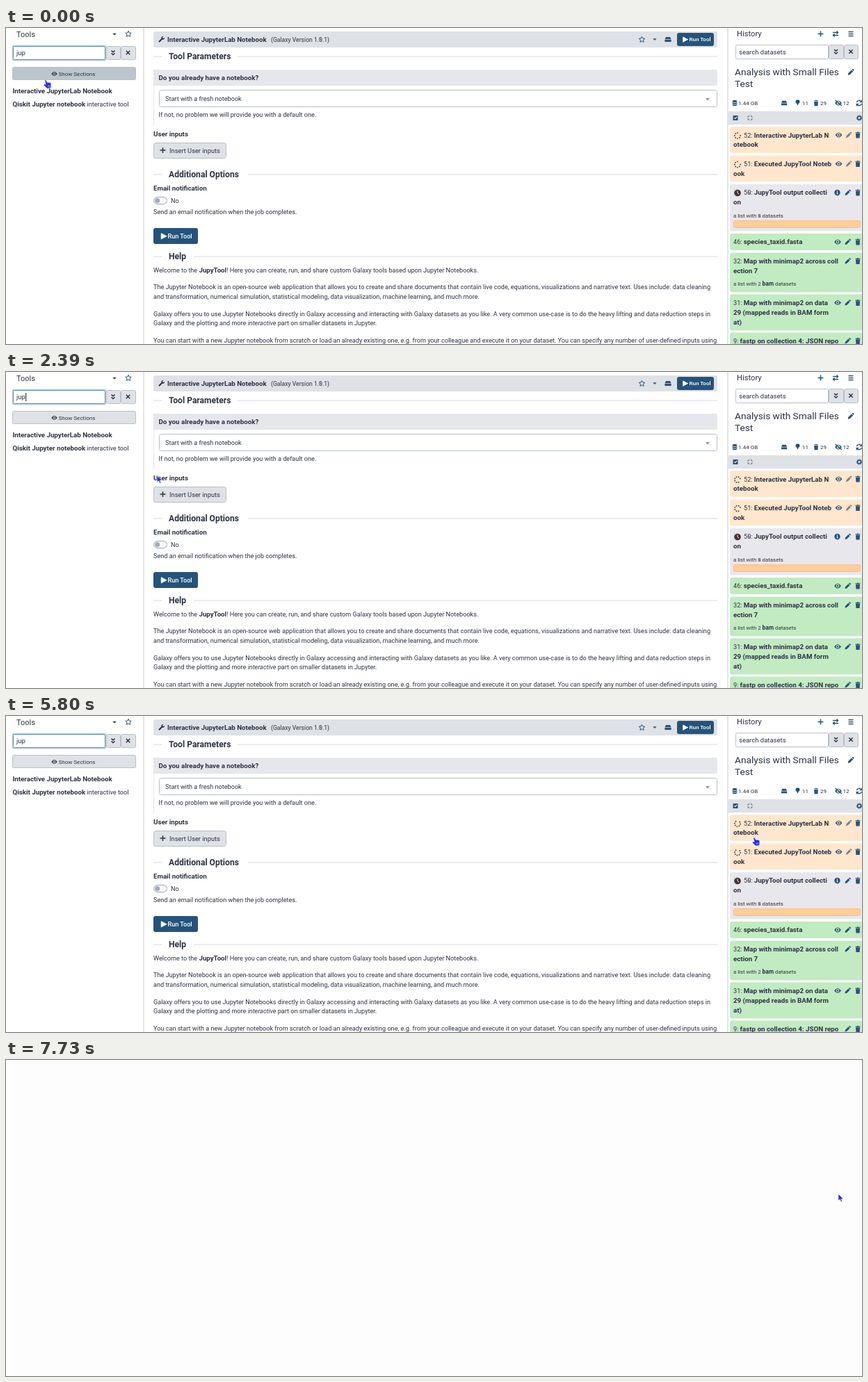
An HTML page for the animation above (8000 ms loop, 1231 px wide and 455 px high).

```html
<!DOCTYPE html>
<html lang="en">
<head>
<meta charset="utf-8">
<style>
html, body { margin: 0; width: 100%; height: 100%; overflow: hidden; background: #fff; }
svg { display: block; width: 100vw; height: 100vh; }
text { font-family: Roboto, sans-serif; fill: #2c3143; white-space: pre; }
.b { font-weight: 700; font-size: 1.065em; }
.i { font-style: italic; }
.light { fill: #fff; font-weight: 500; }
</style>
</head>
<body>
<svg id="stage" viewBox="0 0 1231 455"></svg>
<script>
const stage = document.getElementById('stage');
const BLUE = '#25537b', DARK = '#2c3143', GREY = '#dee2e6', EDGE = '#b9bec8';
const ORANGE = '#ffe6cd', AMBER = '#ffcc99', GREEN = '#c2ebc2';

function add(tag, attrs, parent = stage) {
  const node = document.createElementNS('http://www.w3.org/2000/svg', tag);
  for (const key in attrs) node.setAttribute(key, attrs[key]);
  return parent.appendChild(node);
}
const group = (parent) => add('g', {}, parent);
const box = (x, y, x2, y2, fill, more = {}, parent) =>
  add('rect', { x, y, width: x2 - x, height: y2 - y, fill, ...more }, parent);
const framed = (x, y, x2, y2, fill, stroke = EDGE, rx = 2) =>
  box(x + .5, y + .5, x2 - .5, y2 - .5, fill, { stroke, rx });
const path = (d, more, parent) => add('path', { d, ...more }, parent);

// y is the middle of the capitals; zeros get a back slash.
function text(x, y, size, content, more = {}, parent) {
  const node = add('text', { x, y: y + size * .355, 'font-size': size, ...more }, parent);
  node.innerHTML = content.replace(/<(b|i)>/g, '<tspan class="$1">').replace(/<\/[bi]>/g, '</tspan>');
  [...node.textContent].forEach((char, i) => {
    if (char !== '0') return;
    const p = node.getStartPositionOfChar(i);
    path(`M${p.x + size * .17} ${p.y - size * .55}l${size * .24} ${size * .42}`,
      { stroke: more.class ? '#fff' : DARK, 'stroke-width': .8 }, parent);
  });
  return node;
}

// Glyphs around 0,0; the listed ones are drawn as lines.
const glyphs = {
  plus: 'M-4 0h8M0-4v8',
  down: 'M-2.5-3l2.5 2.3L2.5-3M-2.5.7L0 3 2.5.7',
  cross: 'M-2.7-2.7l5.4 5.4M2.7-2.7l-5.4 5.4',
  bars: 'M-3.5-3h7M-3.5 0h7M-3.5 3h7',
  star: 'M0-4.2L1.3-1.5 4.2-1.2 2 .8 2.6 3.8 0 2.3-2.6 3.8-2 .8-4.2-1.2-1.3-1.5Z',
  swap: 'M-4-2h7.5M1.5-4l2 2-2 2M4 2h-7.5M-1.5 0l-2 2 2 2',
  sync: 'M-3.6-.8A3.7 3.7 0 0 1 3-2.2M3.6-4.2v2.8H.8M3.6.8A3.7 3.7 0 0 1-3 2.2M-3.6 4.2V1.4H-.8',
  shrink: 'M-4.2-1.7h2.5v-2.5M4.2-1.7H1.7v-2.5M-4.2 1.7h2.5v2.5M4.2 1.7H1.7v2.5',
  caret: 'M-2.7-1.3h5.4L0 1.6Z',
  play: 'M-4-4.5L4.5 0-4 4.5Z',
  eye: 'M-5 0Q0-7 5 0 0 7-5 0ZM-2.4 0a2.4 2.4 0 1 0 4.8 0a2.4 2.4 0 1 0-4.8 0ZM-1.3 0a1.3 1.3 0 1 0 2.6 0a1.3 1.3 0 1 0-2.6 0Z',
  trash: 'M-3.5-3.8h2l.6-.8H.9l.6.8h2v1h-7ZM-3-2.2h6L2.6 4.5h-5.2Z',
  pencil: 'M-4.3 4.3l.6-2.8L.9-3.1 3.1-.9-1.5 3.7ZM1.5-3.7l.9-.8 1 .1 1.1 1.1v.9l-.8.9Z',
  drive: 'M-3-3.5h6L4.6-.3h-9.2ZM-4.6.5h9.2v3h-9.2Z',
  data: 'M-3.5-3.3Q0-5.5 3.5-3.3v1.4Q0-.3-3.5-1.9ZM-3.5-1Q0 .6 3.5-1v2Q0 2.6-3.5 1ZM-3.5 1.9Q0 3.5 3.5 1.9v1.6Q0 5.5-3.5 3.5Z',
  pin: 'M0 4.5C-1-.3-3.2.3-3.2-1.8a3.2 3.2 0 0 1 6.4 0C3.2.3 1-.3 0 4.5Z',
  wrench: 'M-4.3 2.7L-.2-1.2C-.8-3.6 1-5 3-4.5L1.3-2.8l1.5 1.5L4.5-3C5 -.8 3.2.8 1.2.2L-2.8 4.2Z',
  check: 'M-3.5-3.5h7v7h-7ZM-2.2.1l.8-.8 1 1L1.8-1.9l.8.8L-.4 2Z'
};
const lined = ['plus', 'down', 'cross', 'bars', 'star', 'swap', 'sync', 'shrink'];
const thin = ['star', 'shrink'];
function icon(name, x, y, color = BLUE, scale = 1, parent) {
  const paint = lined.includes(name)
    ? { fill: 'none', stroke: color, 'stroke-width': thin.includes(name) ? 1 : 1.5 }
    : { fill: color, 'fill-rule': 'evenodd' };
  return path(glyphs[name], { ...paint, transform: `translate(${x} ${y}) scale(${scale})` }, parent);
}
function gear(x, y) {
  const ring = { cx: x, cy: y, fill: 'none', stroke: BLUE };
  add('circle', { ...ring, r: 2.5, 'stroke-width': 1.7 });
  add('circle', { ...ring, r: 3.6, 'stroke-width': 1, 'stroke-dasharray': '1.41 1.41' });
}

// Tool panel
text(15, 9, 11, 'Tools');
icon('caret', 156, 9, DARK);
icon('star', 176, 8.5);
const focusGlow = box(8.5, 24.5, 144.5, 47.5, '#c3d1de', { rx: 3 });
const searchBox = framed(10, 26, 143, 46, '#fff', BLUE);
text(15, 36, 9.6, 'jup');
const textCaret = box(28.3, 30, 29.2, 42, '#000');
framed(144, 26, 165, 46, GREY);
icon('down', 154, 35.5, DARK);
framed(165, 26, 187, 46, GREY);
icon('cross', 175.5, 35.5, DARK);
const sections = framed(9, 56, 187, 75, GREY);
icon('eye', 69.5, 66, DARK, .85);
text(75.5, 66, 8.05, 'Show Sections');
const toolRow = box(0, 81, 197, 100, '#e6e7ec');
text(9.5, 90.5, 9.15, '<b>Interactive JupyterLab Notebook</b>');
text(9.5, 110, 9.15, '<b>Qiskit Jupyter notebook</b> interactive tool');
box(197.5, 0, 198.5, 455, '#c9ccd3');

// Tool form
function heading(y, label, lineStart) {
  box(212, y - .5, 224, y + .5, '#d6d9de');
  box(lineStart, y - .5, 1023, y + .5, '#d6d9de');
  text(234, y, 12.1, label, { 'font-weight': 700 });
}
box(212, 5, 1023, 28, '#dee1e6', { rx: 2 });
icon('wrench', 223.5, 16.5, DARK);
text(232, 16.5, 9.1, '<b>Interactive JupyterLab Notebook</b>');
text(381, 16.5, 8.65, '(Galaxy Version 1.0.1)');
icon('star', 914.5, 16.5);
icon('caret', 933, 16.5);
icon('drive', 952, 16.5);
framed(965, 7, 1018, 26, BLUE, BLUE);
icon('play', 977, 16.5, '#fff', .95);
text(982.5, 16.5, 8.05, 'Run Tool', { class: 'light' });

heading(41, 'Tool Parameters', 333);
box(212, 60, 213, 140, '#e3e4e9');
box(212, 60, 1023, 83, '#e6e7ec', { rx: 2 });
text(219.5, 71.5, 9.15, '<b>Do you already have a notebook?</b>');
framed(220, 89, 1023, 114, '#fff', EDGE, 3);
text(229, 101.5, 9.15, 'Start with a fresh notebook');
icon('caret', 1009, 102.5, '#999', 1.2);
text(219.5, 125, 9.15, 'If not, no problem we will provide you with a default one.');
text(212, 153, 9.15, '<b>User inputs</b>');
framed(212, 165, 317, 188, GREY, EDGE, 3);
icon('plus', 225.5, 176, DARK);
text(235, 176.3, 9.3, 'Insert User inputs');

heading(211, 'Additional Options', 348);
text(212, 230.5, 9.15, '<b>Email notification</b>');
framed(212, 243, 232, 254, '#fff', '#9da3af', 5.5);
add('circle', { cx: 217.7, cy: 248.5, r: 3.6, fill: '#a3a9b5' });
text(237, 248.5, 9.15, 'No');
text(212, 265, 9.15, 'Send an email notification when the job completes.');
const runButton = box(212, 288, 276, 311, BLUE, { rx: 3 });
icon('play', 227, 299.7, '#fff', 1.05);
text(232.5, 299.7, 9.15, 'Run Tool', { class: 'light' });

heading(329, 'Help', 270);
[
  [348.5, 'Welcome to the <b>JupyTool</b>! Here you can create, run, and share custom Galaxy tools based upon Jupyter Notebooks.'],
  [373, 'The Jupyter Notebook is an open-source web application that allows you to create and share documents that contain live code, equations, visualizations and narrative text. Uses include: data cleaning'],
  [386.5, 'and transformation, numerical simulation, statistical modeling, data visualization, machine learning, and much more.'],
  [411.5, 'Galaxy offers you to use Jupyter Notebooks directly in Galaxy accessing and interacting with Galaxy datasets as you like. A very common use-case is to do the heavy lifting and data reduction steps in'],
  [425, 'Galaxy and the plotting and more <i>interactive</i> part on smaller datasets in Jupyter.'],
  [450, 'You can start with a new Jupyter notebook from scratch or load an already existing one, e.g. from your colleague and execute it on your dataset. You can specify any number of user-defined inputs using']
].forEach(([y, line]) => text(212, y, 9.12, line));

// History panel
box(1037.5, 0, 1038.5, 455, '#c9ccd3');
text(1051, 8.5, 11.2, 'History');
icon('plus', 1171.5, 8.5);
icon('swap', 1193, 8.5);
icon('bars', 1215, 8.5);
framed(1049, 24, 1183, 45, '#fff');
text(1054, 34.5, 9.5, 'search datasets');
framed(1183, 24, 1205, 45, GREY);
icon('down', 1193.5, 34, DARK);
framed(1205, 24, 1226, 45, GREY);
icon('cross', 1215, 34, DARK);
text(1048, 63.5, 13.7, 'Analysis with Small Files');
text(1048, 80, 13.7, 'Test');
icon('pencil', 1215, 63.5);
icon('data', 1048, 108, BLUE, .95);
text(1053, 108, 8.05, '1.44 GB');
icon('drive', 1119, 108, BLUE, .9);
icon('pin', 1138.5, 108, BLUE, .95);
text(1145, 108, 8.05, '11');
icon('trash', 1165, 108, BLUE, .95);
text(1171, 108, 8.05, '29');
icon('eye', 1197, 108);
path('M1192.5 104l9.5 8', { stroke: BLUE, 'stroke-width': 1.4 });
text(1203.5, 108, 8.05, '12');
icon('sync', 1227, 108);
box(1039, 120, 1231, 139, '#dee1e6');
icon('check', 1049, 129.5);
icon('shrink', 1070, 129.5, '#6c7486', .95);
gear(1227, 129.5);

function item(top, bottom, fill) {
  return box(1041, top, 1235, bottom, fill, { rx: 3 });
}
function title(y, x, ...lines) {
  lines.forEach((line, i) => text(i ? 1046 : x, y + i * 13.9, 9.15, line));
}
function actions(y, first, editColor = BLUE) {
  if (first) icon(first, editColor === BLUE ? 1196 : 1197.5, y);
  icon('pencil', editColor === BLUE ? 1210.5 : 1212, y, editColor, .95);
  icon('trash', 1225, y);
}
const spinners = [];
function spinner(x, y) {
  const dots = group(add('g', { transform: `translate(${x} ${y})` }));
  for (let k = 0; k < 7; k++) {
    const angle = k * Math.PI / 4;
    add('circle', { cx: 4.1 * Math.cos(angle), cy: 4.1 * Math.sin(angle), r: .95, fill: '#4c3a2c' }, dots);
  }
  spinners.push(dots);
}

item(142, 180, ORANGE);
spinner(1052, 155);
title(154.3, 1061, '52: <b>Interactive JupyterLab N</b>', '<b>otebook</b>');
actions(154, 'eye', '#84807f');

const executed = item(183.5, 221.5, ORANGE);
const eyeFocus = framed(1189, 186, 1206, 206, '#e7bd93', '#8d8a8c', 3);
spinner(1052, 196.5);
title(195.5, 1061, '51: <b>Executed JupyTool Noteb</b>', '<b>ook</b>');
actions(195.5, 'eye', '#84807f');

item(225, 292.5, '#e8e7eb');
add('circle', { cx: 1052, cy: 237.5, r: 4.8, fill: '#4c3030' });
path('M1052 234.5v3l2 1.5', { stroke: '#fff', fill: 'none' });
title(237, 1061, '50: <b>JupyTool output collecti</b>', '<b>on</b>');
add('circle', { cx: 1195.5, cy: 237, r: 4.2, fill: BLUE });
path('M1195.5 234.3v1.2M1195.5 236.3v3.3', { stroke: '#fff', 'stroke-width': 1.3 });
actions(237);
text(1046, 270.5, 7.85, 'a list with 0 datasets');
framed(1046, 277, 1229, 288, AMBER, '#f4c18e', 2);

item(296, 320, GREEN);
title(308, 1046, '46: <b>species_taxid.fasta</b>');
actions(308, 'eye');
item(323.5, 380.5, GREEN);
title(335.7, 1046, '32: <b>Map with minimap2 across coll</b>', '<b>ection 7</b>');
actions(335.5);
text(1046, 368.5, 7.85, 'a list with 2 <b>bam</b> datasets');
item(383.5, 435.5, GREEN);
title(395.7, 1046, '31: <b>Map with minimap2 on data</b>', '<b>29 (mapped reads in BAM form</b>', '<b>at)</b>');
actions(395.5, 'eye');
item(438.5, 460, GREEN);
title(450.5, 1046, '9: <b>fastp on collection 4: JSON repo</b>');
actions(450.5);

// Overlays
const tooltip = group();
path('M240 316l4.5-5 4.5 5Z', { fill: '#363a49' }, tooltip);
box(205, 316, 340.5, 345, '#363a49', { rx: 3, opacity: .95 }, tooltip);
const tip = { class: 'light', 'text-anchor': 'middle', style: 'font-weight: 700' };
text(272.5, 324, 7.85, 'Run tool: Interactive JupyterLab', tip, tooltip);
text(272.5, 336.5, 7.85, 'Notebook (1.0.1)', tip, tooltip);

const blank = group();
box(0, 0, 1231, 455, '#fff', {}, blank);
box(7, 0, 1231, 455, '#fdfdfd', {}, blank);

const pointer = group();
const ink = { fill: '#1a2cf0', stroke: '#fff', 'stroke-width': .5 };
const arrow = path('M0 0V9.6L2.3 7.6 3.9 11.2 5.5 10.4 4 7H7Z', ink, pointer);
const hand = group(pointer);
path('M-1.2.6Q0-.8 1 .6L2 3.4Q3 2.6 3.8 3.5 4.9 2.8 5.6 3.7 7 3.2 7.5 4.6L8 8.2 7.2 11.5 2.3 12 -2.6 7.6Q-3.2 6 -1.5 6L.2 6.6Z', ink, hand);
path('M3.2 7.4v2.6M4.7 7.2v2.6M6.2 7v2.6', { stroke: '#fff', 'stroke-width': .5 }, hand);

// Pointer stops: time, x, y
const stops = [
  [0, 57, 75], [450, 57, 75], [1190, 139, 92], [1750, 139, 92], [2200, 215, 140],
  [3380, 253, 287], [3570, 260, 292], [3900, 266, 297], [4800, 266, 297],
  [5700, 1076, 175], [5900, 1076, 175], [6400, 1135, 201], [6850, 1196, 198],
  [7100, 1196, 191], [7600, 1196, 191], [7700, 1197, 193], [8000, 1197, 193]
];
function pointerAt(t) {
  const k = stops.findIndex((stop) => stop[0] > t);
  const [t0, x0, y0] = stops[k - 1], [t1, x1, y1] = stops[k];
  const u = (t - t0) / (t1 - t0), ease = u * u * (3 - 2 * u);
  return [x0 + (x1 - x0) * ease, y0 + (y1 - y0) * ease];
}
const show = (node, on) => node.setAttribute('visibility', on ? 'visible' : 'hidden');
const fill = (node, color) => node.setAttribute('fill', color);

const STEP = 148.65, LAST = 52, CLICK = 7280;
function draw(now) {
  const step = Math.min(LAST, Math.floor(now % 8000 / STEP));
  const t = step * STEP;
  const [x, y] = pointerAt(t);
  const within = (x1, y1, x2, y2) => x >= x1 && x <= x2 && y >= y1 && y <= y2;
  const onSections = within(9, 56, 187, 77), onTool = within(0, 81, 197, 100);
  const onRun = within(212, 288, 276, 311), onItem = within(1041, 142, 1231, 455);
  const clicked = t > CLICK, gone = step === LAST;

  fill(sections, onSections ? '#bcc5ce' : GREY);
  show(toolRow, onTool);
  fill(runButton, onRun ? '#1b3a57' : BLUE);
  show(tooltip, onRun && t > 3650);
  show(focusGlow, !clicked);
  searchBox.setAttribute('stroke', clicked ? EDGE : '#5a8ab5');
  show(textCaret, !clicked && (t + 870) % 1000 < 500);
  fill(executed, clicked ? AMBER : ORANGE);
  show(eyeFocus, clicked && !gone);
  spinners.forEach((node) => node.setAttribute('transform', `rotate(${t * .18})`));
  show(blank, gone);

  const pointing = !gone && (onSections || onTool || onRun || onItem);
  show(hand, pointing);
  show(arrow, !pointing);
  pointer.setAttribute('transform', `translate(${x} ${y})`);
}

const start = performance.now();
function loop() {
  draw(performance.now() - start);
  requestAnimationFrame(loop);
}
loop();
</script>
</body>
</html>
```
